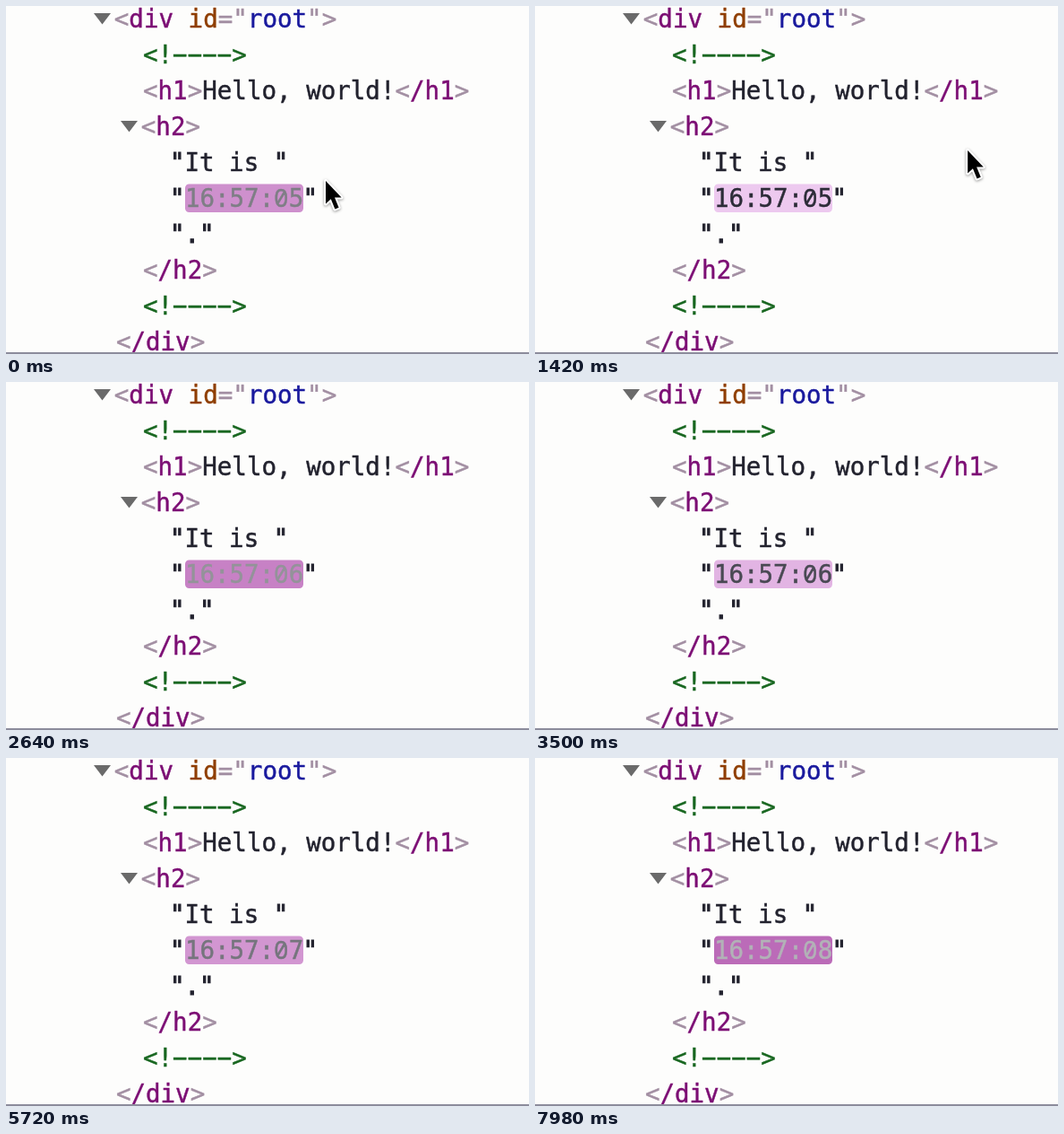
Recreate the animation shown at these times as an HTML page. Size 584 px wide and 388 px high, loop 8 s.

```html
<!DOCTYPE html>
<html lang="en">
<head>
<meta charset="utf-8">
<title>Live element tree</title>
<style>
  html, body { margin: 0; width: 100%; height: 100%; overflow: hidden; background: #fdfdfc; }
  svg { display: block; width: 584px; height: 388px; }
  text { font: 27.5px "DejaVu Sans Mono", monospace; fill: #22222e; white-space: pre; }
  text { stroke: currentColor; stroke-width: .45px; color: #22222e; fill: currentColor; }
  tspan { fill: currentColor; stroke: currentColor; }
  .bracket { color: #a28ea2; }
  .tag { color: #7c0e74; }
  .attr { color: #8f3e00; }
  .value { color: #1a1a9e; }
  .comment { color: #17661f; }
  .arrow { fill: #6a6a6a; }
  .quote { stroke-width: 1px; }
  .zero { font-family: "Noto Sans Mono", monospace; }
  #cursor { filter: drop-shadow(0 1px 1.5px rgba(0, 0, 0, .4)); }
</style>
</head>
<body>
<svg viewBox="0 0 584 388">
  <path class="arrow" d="M98 8h19l-9.5 12.5zM128 128h19l-9.5 12.5z"/>
  <text x="120.8" y="24"><tspan class="bracket">&lt;</tspan><tspan class="tag">div</tspan> <tspan class="attr">id</tspan><tspan class="bracket">="</tspan><tspan class="value">root</tspan><tspan class="bracket">"&gt;</tspan></text>
  <text class="comment" x="153" y="64">&lt;!−−−−&gt;</text>
  <text x="153" y="104"><tspan class="bracket">&lt;</tspan><tspan class="tag">h1</tspan><tspan class="bracket">&gt;</tspan>Hello, world!<tspan class="bracket">&lt;</tspan><tspan class="tag">/h1</tspan><tspan class="bracket">&gt;</tspan></text>
  <text x="150.8" y="144"><tspan class="bracket">&lt;</tspan><tspan class="tag">h2</tspan><tspan class="bracket">&gt;</tspan></text>
  <text x="182.9" y="184"><tspan class="quote">"</tspan>It is <tspan class="quote">"</tspan></text>
  <rect id="flash" x="200" y="198.5" width="132" height="31.5" rx="4.5"/>
  <text class="quote" x="182.9" y="224">"</text>
  <g id="clock">
    <text x="199.9" y="224">16:57:</text>
    <text class="zero" x="299.1" y="224">0</text>
    <text id="second" x="315.7" y="224">5</text>
  </g>
  <text class="quote" x="331.6" y="224">"</text>
  <text class="quote" x="182.9" y="264">"."</text>
  <text x="153" y="304"><tspan class="bracket">&lt;</tspan><tspan class="tag">/h2</tspan><tspan class="bracket">&gt;</tspan></text>
  <text class="comment" x="153" y="344">&lt;!−−−−&gt;</text>
  <text x="122.9" y="384"><tspan class="bracket">&lt;</tspan><tspan class="tag">/div</tspan><tspan class="bracket">&gt;</tspan></text>
  <rect y="386" width="584" height="2" fill="#8c8c9c"/>
  <path id="cursor" d="M0 0V25.5L5.8 20.2L10.4 31.5L14.6 29.7L10 18.6H17.6Z"
        fill="#000" stroke="#fff" stroke-width="4" paint-order="stroke" stroke-linejoin="round"/>
</svg>
<script>
  const LOOP = 8000;
  const TICK_STEPS = 60;      // one clock second
  const FADE_STEPS = 67.2;
  const FIRST_AGE = 16;       // steps since the clock last ticked
  const [flash, clock, second, cursor] =
    ["flash", "clock", "second", "cursor"].map(id => document.getElementById(id));
  const clockTexts = clock.querySelectorAll("text");

  // Steps last 20, 20 and 100 ms in turn.
  function stepAt(time) {
    const shifted = time + 20;
    const rest = shifted % 140;
    return 3 * Math.floor(shifted / 140) + (rest < 20 ? 0 : rest < 40 ? 1 : 2);
  }

  // cubic-bezier(0, 0, .2, 1)
  function easeOut(x) {
    let low = 0, high = 1;
    for (let i = 0; i < 20; i++) {
      const mid = (low + high) / 2;
      if (0.6 * mid ** 2 + 0.4 * mid ** 3 < x) low = mid; else high = mid;
    }
    return 3 * low ** 2 - 2 * low ** 3;
  }

  function mix(from, to, amount) {
    return `rgb(${from.map((v, i) => Math.round(v + (to[i] - v) * amount))})`;
  }

  function draw(time) {
    const step = stepAt(time);
    const age = step + FIRST_AGE;
    const fade = easeOut((age % TICK_STEPS) / FADE_STEPS);

    flash.style.fill = mix([158, 54, 153], [241, 208, 243], fade);
    const ink = mix([255, 255, 255], [34, 34, 46], fade);
    clockTexts.forEach(text => { text.style.color = ink; });
    second.textContent = 5 + Math.floor(age / TICK_STEPS);

    const travel = Math.max(0, step - 17.5) ** 2;
    cursor.setAttribute("transform", `translate(${357 + 0.6 * travel} ${195 - 0.162 * travel})`);
    cursor.style.display = step < 38 ? "" : "none";
  }

  const start = performance.now();
  function frame() {
    draw((performance.now() - start) % LOOP);
    requestAnimationFrame(frame);
  }
  frame();
</script>
</body>
</html>
```
